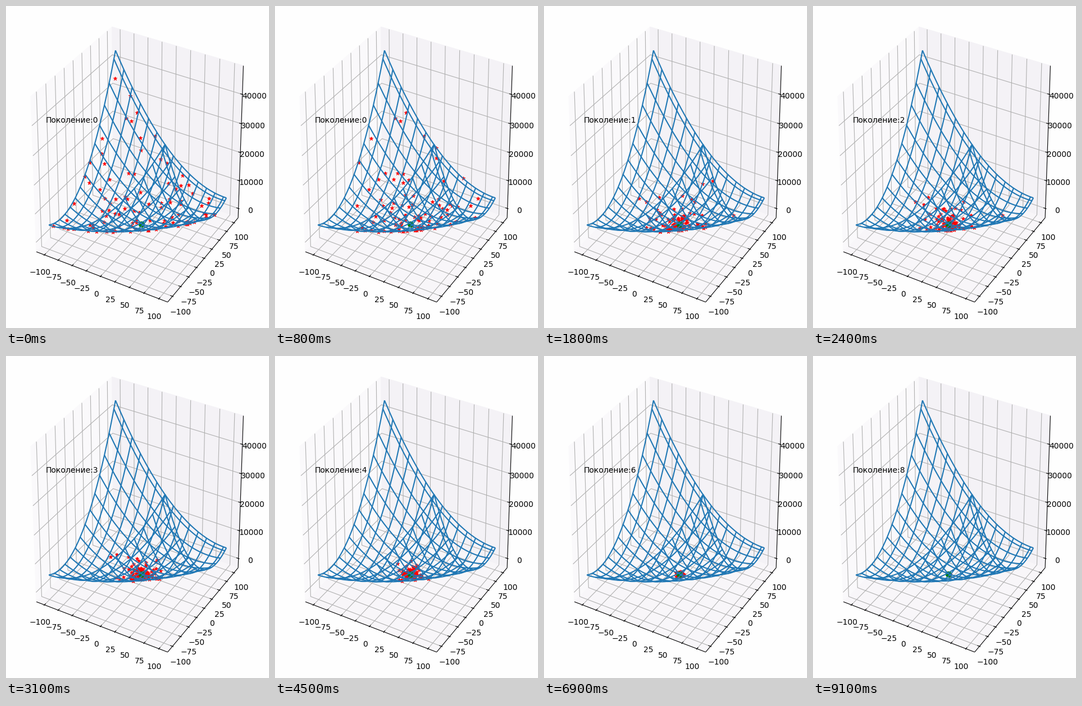
These frames come from a looping animation (468x574 px, 9.2 s). A matplotlib script:

```python
import numpy as np
import matplotlib.pyplot as plt
from matplotlib.animation import FuncAnimation
from matplotlib.collections import LineCollection

W, H, DPI = 468, 574, 100
FRAMES, STEP = 92, 100
STARS, GEN_FRAMES, LAST_GEN = 100, 10, 8
P = 0.5 + 1 / 48            # box faces in unit coordinates
PAD = 0.061                 # distance of tick labels from the box
MIN_XY = (2, 4)
Z_LOW, Z_HIGH = -12, 46200


def surface(x, y):
    return x**2 + 1.5 * y**2 - 2 * x * y + 4 * x - 8 * y


def unit(v):
    return np.asarray(v) / 220


def unit_z(z):
    return ((np.asarray(z) - Z_LOW) / (Z_HIGH - Z_LOW) - 0.5) / 1.1


def project(a, b, c):
    """Perspective view (elev 30, azim -60) from the centred unit box to pixels."""
    a, b, c = np.broadcast_arrays(a, b, c)
    s3 = np.sqrt(3)
    depth = 10 - (s3 / 4 * a - 0.75 * b + 0.5 * c)
    right = s3 / 2 * a + 0.5 * b
    up = -0.25 * a + s3 / 4 * b + s3 / 2 * c
    return np.stack([236 + 2588 * right / depth,
                     273.4 - 3035 * up / depth], axis=-1)


def on_surface(x, y):
    return project(unit(x), unit(y), unit_z(surface(x, y)))


def path(*points):
    return np.array([project(*p) for p in points])


fig = plt.figure(figsize=(W / DPI, H / DPI), dpi=DPI, facecolor="#fefefe")
ax = fig.add_axes([0, 0, 1, 1])
ax.set_xlim(-0.5, W - 0.5)
ax.set_ylim(H - 0.5, -0.5)
ax.axis("off")


def draw_lines(lines, color, width, zorder):
    ax.add_collection(LineCollection(lines, colors=color, linewidths=width,
                                     zorder=zorder))


def draw_panes():
    faces = [
        ("#faf9fb", [(-P, -P, -P), (-P, P, -P), (-P, P, P), (-P, -P, P)]),
        ("#f4f2f6", [(-P, P, -P), (P, P, -P), (P, P, P), (-P, P, P)]),
        ("#f8f6f9", [(-P, -P, -P), (P, -P, -P), (P, P, -P), (-P, P, -P)]),
    ]
    for shade, corners in faces:
        ax.add_patch(plt.Polygon(path(*corners), color=shade, linewidth=1,
                                 zorder=1))


def tick_label(pos, value):
    x, y = project(*pos)
    ax.text(x, y, str(value).replace("-", "\u2212"), fontsize=10,
            ha="center", va="top", zorder=4)


def draw_axes():
    grid, ticks = [], []
    out, inn = 0.1 / 12, 0.2 / 12
    for v in range(-100, 101, 25):
        u = unit(v)
        grid.append(path((u, -P, -P), (u, P, -P), (u, P, P)))
        grid.append(path((P, u, -P), (-P, u, -P), (-P, u, P)))
        ticks.append(path((u, -P - out, -P), (u, -P + inn, -P)))
        ticks.append(path((P + out, u, -P), (P - inn, u, -P)))
        tick_label((u, -P - PAD, -P - PAD), v)
        tick_label((P + PAD, u, -P - PAD), v)
    for v in range(0, 40001, 10000):
        u = unit_z(v)
        grid.append(path((-P, -P, u), (-P, P, u), (P, P, u)))
        ticks.append(path((P + out, P, u), (P - inn, P, u)))
        tick_label((P + PAD, P + PAD, u), v)
    edges = [path((-P, -P, -P), (P, -P, -P)),
             path((P, -P, -P), (P, P, -P)),
             path((P, P, -P), (P, P, P))]
    draw_lines(grid, "#b0b0b0", 0.8, 2)
    draw_lines(edges + ticks, "black", 0.8, 3)


def draw_wires():
    run = np.arange(-100, 101)
    wires = []
    for v in [*range(-100, 100, 15), 100]:
        side = np.full(run.shape, v)
        wires += [on_surface(side, run), on_surface(run, side)]
    draw_lines(wires, "#1f77b4", 1.5, 8)


rng = np.random.default_rng(7)


def population(gen):
    """Uniform at first, then ever tighter around the minimum."""
    if gen == 0:
        x, y = rng.uniform(-100, 100, (2, STARS))
    else:
        spread = 28 * 0.62 ** (gen - 1)
        x, y = (np.clip(rng.laplace(m, spread, STARS), -100, 100)
                for m in MIN_XY)
    return on_surface(x, y)


gens = range(LAST_GEN + 2)
pops = [population(g) for g in gens]
# Each individual is replaced once per generation, at a frame of its own.
births = [g * GEN_FRAMES - rng.integers(0, GEN_FRAMES, STARS) for g in gens]


def stars_at(frame):
    pts = pops[0].copy()
    for birth, pop in zip(births[1:], pops[1:]):
        born = birth <= frame
        pts[born] = pop[born]
    return pts


draw_panes()
draw_axes()
draw_wires()
stars, = ax.plot([], [], "*", color="red", ms=5, mew=0.7, zorder=6)
ax.plot(*on_surface(*MIN_XY), "o", color="green", ms=7, mew=1, zorder=7)
title = ax.text(70.2, 207.5, "", fontsize=10, ha="left", va="baseline",
                zorder=9)


def update(frame):
    stars.set_data(*stars_at(frame).T)
    title.set_text(f"Поколение:{min(frame // GEN_FRAMES, LAST_GEN)}")
    return stars, title


anim = FuncAnimation(fig, update, frames=FRAMES, interval=STEP,
                     repeat=True, repeat_delay=0)
plt.show()
```
